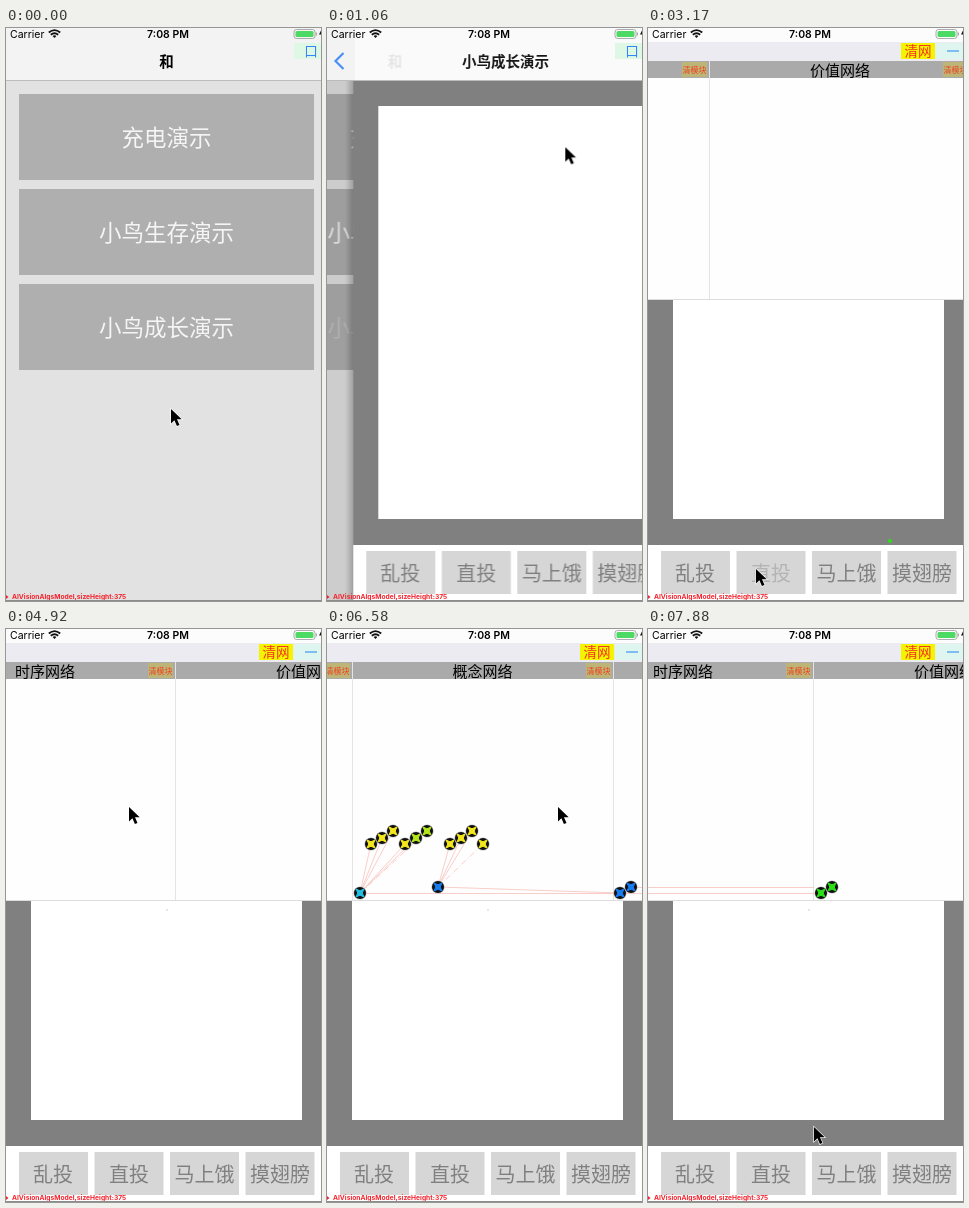
Animation, 315 px wide and 573 px high, one loop 8000 ms. Source, as an HTML page:

```html
<!DOCTYPE html>
<html lang="zh">
<head>
<meta charset="utf-8">
<title>演示</title>
<style>
html, body { margin: 0; width: 100%; height: 100%; overflow: hidden; background: #fff; }
svg { display: block; width: 315px; height: 573px; }
text { font-family: "Noto Sans CJK SC", "Noto Sans CJK", "Noto Sans CJK JP", sans-serif; text-anchor: middle; }
.latin { font-family: Inter, "Liberation Sans", sans-serif; }
.start { text-anchor: start; }
.big { font-size: 22.5px; fill: #f5f5f5; }
.btn { font-size: 20px; fill: #808080; }
.nav { font-size: 14.5px; font-weight: 700; }
.head { font-size: 15px; }
.badge { font-size: 8px; fill: #f0401c; }
.links { fill: none; stroke: #f7b9b2; stroke-width: .7; }

/* One loop is 8000 ms, so 1% is 80 ms. */
.anim { animation: 8s linear infinite both; }

/* push transition */
#home, #homeTitle { animation-name: homeOut; }
#page { animation-name: pageIn; }
#navIn { animation-name: navIn; }
#newTitle { animation-name: titleIn; }
#back, #titleFade { animation-name: fadeIn; }
#oldFade { animation-name: fadeOut; }
#dim { animation-name: dim; }
@keyframes homeOut { 0%, 9.19% { transform: none; animation-timing-function: ease } 15.44%, 100% { transform: translateX(-101px) } }
@keyframes pageIn { 0%, 9.19% { transform: translateX(325px); animation-timing-function: ease } 9.2% { transform: translateX(315px); animation-timing-function: ease } 15.44%, 100% { transform: none } }
@keyframes navIn { 0%, 9.19% { transform: translateX(333px); animation-timing-function: ease } 15.44%, 100% { transform: none } }
@keyframes titleIn { 0%, 9.19% { transform: translateX(217px); animation-timing-function: ease } 15.44%, 100% { transform: none } }
@keyframes fadeIn { 0%, 9.19% { opacity: 0; animation-timing-function: ease } 15.44%, 100% { opacity: 1 } }
@keyframes fadeOut { 0%, 9.19% { opacity: 1; animation-timing-function: ease } 15.44%, 100% { opacity: 0 } }
@keyframes dim { 0%, 9.19% { opacity: 0; animation-timing-function: ease } 15.44%, 100% { opacity: .1 } }

/* hard switches */
#tapHome { animation-name: tapHome; }
#tapThrow { animation-name: tapThrow; }
#panel { animation-name: show; }
#open { animation-name: hide; }
#dash { animation-name: dash; }
#net { animation-name: net; }
#crumb { animation-name: crumb; }
.step { animation-timing-function: step-end; }
@keyframes tapHome { 0% { opacity: 1 } 8.8% { opacity: .28 } 14% { opacity: 1 } }
@keyframes tapThrow { 0% { opacity: 1 } 39.5% { opacity: .4 } 41% { opacity: 1 } }
@keyframes show { 0% { visibility: hidden } 21.9%, 100% { visibility: visible } }
@keyframes hide { 0% { visibility: visible } 21.9%, 100% { visibility: hidden } }
@keyframes dash { 0% { opacity: .1 } 23.4%, 100% { opacity: 1 } }
@keyframes net { 0% { visibility: hidden } 68.8%, 100% { visibility: visible } }
@keyframes crumb { 0% { visibility: hidden } 49.8%, 100% { visibility: visible } }

/* thrown food */
#food { animation-name: food; }
@keyframes food {
  0%, 39.5% { transform: translate(242px, 513px); opacity: 0 }
  39.51%, 41% { transform: translate(242px, 513px); opacity: 1 }
  48.3% { transform: translate(161px, 281px); opacity: 1 }
  48.31%, 100% { transform: translate(161px, 281px); opacity: 0 }
}

/* dragging the columns */
#strip { animation-name: scroll; }
@keyframes scroll {
  0%, 49.8% { transform: translateX(-460px); animation-timing-function: ease-in-out }
  58.6%, 68.2% { transform: translateX(-352px) }
  70.2% { transform: translateX(-340px) }
  73.8% { transform: translateX(-190px) }
  77.9% { transform: translateX(-30px); animation-timing-function: ease-out }
  82.2%, 83.7% { transform: translateX(26px) }
  88.1% { transform: translateX(-160px) }
  91.2% { transform: translateX(-310px); animation-timing-function: ease-out }
  94%, 100% { transform: translateX(-356px) }
}

#cursor { animation-name: pointer; }
@keyframes pointer {
  0%, 1.45% { transform: translate(165px, 381px) }
  3% { transform: translate(163px, 345px) }
  6%, 8.8% { transform: translate(180px, 303px) }
  10.37% { transform: translate(186px, 244px) }
  13.8% { transform: translate(248px, 96px) }
  17.6% { transform: translate(303px, 26px) }
  19%, 23.4% { transform: translate(305px, 18px) }
  30.9% { transform: translate(138px, 516px) }
  32.3% { transform: translate(122px, 546px) }
  35.2%, 41% { transform: translate(108px, 541px) }
  48.4% { transform: translate(106px, 199px) }
  49.9% { transform: translate(105px, 188px) }
  58.6% { transform: translate(170px, 178px) }
  61.4%, 64.4% { transform: translate(123px, 178px) }
  66%, 68.1% { transform: translate(205px, 178px) }
  70.2% { transform: translate(123px, 180px) }
  73.8% { transform: translate(215px, 178px) }
  77.5%, 83.7% { transform: translate(231px, 178px) }
  88.1% { transform: translate(110px, 185px) }
  91.2% { transform: translate(130px, 190px) }
  94%, 95.5% { transform: translate(213px, 196px) }
  97% { transform: translate(190px, 529px) }
  98.4%, 100% { transform: translate(166px, 498px) }
}
</style>
</head>
<body>
<svg viewBox="0 0 315 573">
  <defs>
    <g id="node">
      <circle r="6.6" fill="#bbb"/>
      <circle r="6" fill="#111"/>
      <path d="M-4-4L0-2.2 4-4 2.2 0 4 4 0 2.2-4 4-2.2 0z" fill="currentColor" stroke="currentColor"/>
    </g>
    <g id="column">
      <path d="M0 33h260v17H0z" fill="#aaa"/>
      <path d="M260.5 33v238" stroke="#e4e4e4"/>
      <path d="M233 34h25v15h-25z" fill="#bdb578"/>
      <text class="badge" x="245.5" y="45">清模块</text>
    </g>
    <linearGradient id="shade">
      <stop offset="0" stop-opacity="0"/>
      <stop offset="1" stop-opacity=".22"/>
    </linearGradient>
    <clipPath id="view"><path d="M0 33h315v239H0z"/></clipPath>
  </defs>

  <path d="M0 0h315v573H0z" fill="#e2e2e2"/>
  <g id="home" class="anim">
    <path d="M13 66h295v86H13zM13 161h295v86H13zM13 256h295v86H13z" fill="#afafaf"/>
    <text class="big" x="160.5" y="118">充电演示</text>
    <text class="big" x="160.5" y="213">小鸟生存演示</text>
    <text id="tapHome" class="big anim step" x="160.5" y="308">小鸟成长演示</text>
  </g>
  <path id="dim" class="anim" d="M0 52h315v521H0z"/>

  <g id="page" class="anim">
    <path d="M-8 52h8v521h-8z" fill="url(#shade)"/>
    <path d="M0 52h315v521H0z" fill="#fff"/>
    <path d="M0 52h315v465H0z" fill="#808080"/>
    <path d="M25 78h271v413H25z" fill="#fff"/>
    <path d="M13 523h69v43H13zM88.500 523h69v43h-69zM164 523h69v43h-69zM239.500 523h69v43h-69z" fill="#d6d6d6"/>
    <text class="btn" x="47" y="552.5">乱投</text>
    <text id="tapThrow" class="btn anim step" x="123" y="552.5">直投</text>
    <text class="btn" x="198.500" y="552.5">马上饿</text>
    <text class="btn" x="274" y="552.5">摸翅膀</text>
  </g>

  <path d="M0 0h315v52H0z" fill="#f3f3f3"/>
  <path id="navIn" class="anim" d="M0 0h315v52H0z" fill="#fafafa"/>
  <path d="M0 52.5h315" stroke="#bcbcbc"/>
  <g id="homeTitle" class="anim"><text id="oldFade" class="nav anim" x="160.5" y="38.5">和</text></g>
  <g id="newTitle" class="anim"><text id="titleFade" class="nav anim" x="160.5" y="38.5">小鸟成长演示</text></g>
  <path id="back" class="anim" d="M16.500 25L8.500 33l8 8" fill="none" stroke="#3b86f7" stroke-width="2.2"/>

  <g id="open" class="anim step">
    <path d="M288 15h27v16h-27z" fill="#dff8e6"/>
    <text x="305" y="28" font-size="13.5" fill="#3485f5">口</text>
  </g>

  <g id="panel" class="anim step">
    <path d="M0 0h315v14H0z" fill="#fcfcfc"/>
    <path d="M0 14h315v19H0z" fill="#ebebf1"/>
    <path d="M0 33h315v238H0z" fill="#fefefe"/>
    <path d="M253 15h34v16h-34z" fill="#f4f400"/>
    <text x="270" y="28" font-size="13.5" fill="#f5301c">清网</text>
    <path d="M288 15h27v16h-27z" fill="#dff6f0"/>
    <path id="dash" class="anim step" d="M299 23h12" stroke="#3f96f2" stroke-width="1.2"/>
    <g clip-path="url(#view)">
      <g id="strip" class="anim">
        <use href="#column" x="-261"/>
        <use href="#column"/>
        <use href="#column" x="261"/>
        <use href="#column" x="522"/>
        <text class="head" x="129.500" y="47.5">概念网络</text>
        <text class="head" x="391" y="47.5">时序网络</text>
        <text class="head" x="652" y="47.5">价值网络</text>
        <g id="net" class="anim step">
          <g class="links">
            <path d="M7 264L18 215M7 264L29 209M7 264L40 202M7 264L52 215M7 264L63 209"/>
            <path d="M85 258L97 215M85 258L108 209M85 258L119 202"/>
            <path d="M7 264L74 202M85 258L130 215" stroke-dasharray="6 2 1 2"/>
            <path d="M7 264.500H522M85 258L267 264M278 258.500H522"/>
          </g>
          <g color="#f2e71c">
            <use href="#node" x="18" y="215"/>
            <use href="#node" x="29" y="209"/>
            <use href="#node" x="40" y="202"/>
            <use href="#node" x="52" y="215"/>
            <use href="#node" x="97" y="215"/>
            <use href="#node" x="108" y="209"/>
            <use href="#node" x="119" y="202"/>
            <use href="#node" x="130" y="215"/>
          </g>
          <g color="#b4e61e">
            <use href="#node" x="63" y="209"/>
            <use href="#node" x="74" y="202"/>
          </g>
          <use href="#node" x="7" y="264" color="#22bfe0"/>
          <g color="#167cf2">
            <use href="#node" x="85" y="258"/>
            <use href="#node" x="267" y="264"/>
            <use href="#node" x="278" y="258"/>
          </g>
          <g color="#2be016">
            <use href="#node" x="529" y="264"/>
            <use href="#node" x="540" y="258"/>
          </g>
        </g>
      </g>
    </g>
    <path d="M0 271.500h315" stroke="#ddd"/>
  </g>

  <circle id="crumb" class="anim step" cx="161" cy="281" r=".7" fill="#bbb"/>
  <circle id="food" class="anim" r="2" fill="#2be016"/>

  <text class="latin start" x="4" y="10" font-size="10.5">Carrier</text>
  <g fill="none" stroke="#111" stroke-width="1.8">
    <path d="M42.800 4.500q5.700-4.800 11.400 0M44.800 6.700q3.700-3 7.400 0"/>
    <path d="M46.600 8l1.900 2 1.900-2q-1.900-1.400-3.800 0z" fill="#111" stroke="none"/>
  </g>
  <text class="latin" x="162" y="10" font-size="10.5" font-weight="600">7:08 PM</text>
  <rect x="288" y="1.500" width="21" height="9" rx="2.500" fill="none" stroke="#999" stroke-width=".8"/>
  <rect x="289.500" y="3" width="18" height="6" rx="1.500" fill="#4cd964"/>
  <path d="M310.300 4.500v3" stroke="#999"/>
  <path d="M315 2.500l-2 4h2z" fill="#111"/>

  <path d="M0 567l2.500 2L0 571z" fill="#f5222d"/>
  <text class="latin start" x="6" y="571" font-size="6.7" font-weight="700" fill="#f5222d">AIVisionAlgsModel,sizeHeight:375</text>
  <path d="M0 572.500h315" stroke="#8c8c8c"/>

  <path id="cursor" class="anim" d="M0 0v14.500l3.400-3.200 2.500 5.800 2.600-1.100L6 10.300h4.700z" stroke="#fff" stroke-width="1.200" paint-order="stroke"/>
</svg>
</body>
</html>
```
